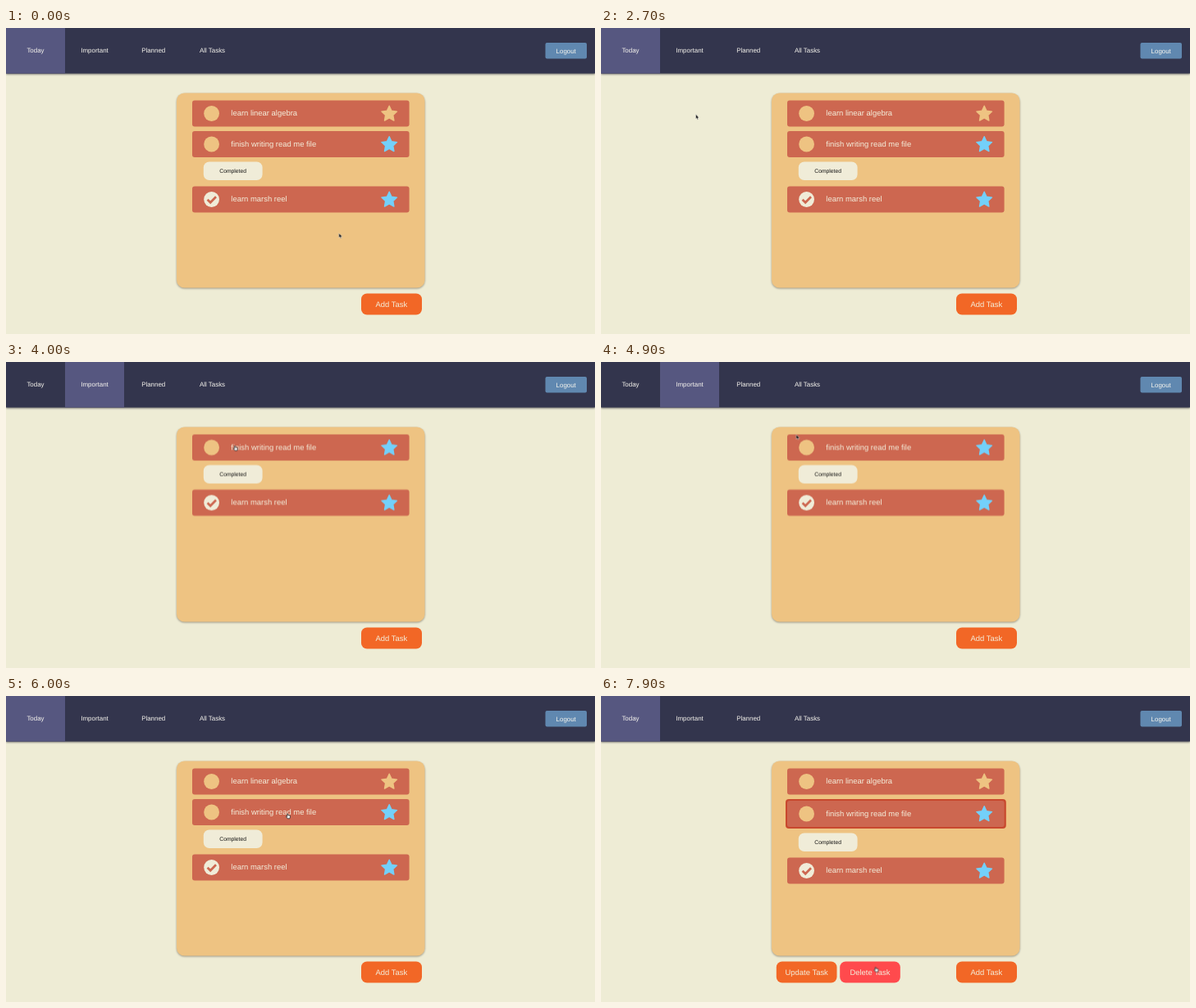
An HTML page that plays this animation: 718x374 px, repeating every 8000 ms.

```html
<!DOCTYPE html>
<html lang="en">
<head>
<meta charset="utf-8">
<title>Task list</title>
<style>
  html, body { margin: 0; height: 100%; overflow: hidden; background: #eeecd5; }
  svg { display: block; width: 100vw; height: 100vh; }
  text {
    font-family: "Liberation Sans", Arial, sans-serif;
    font-size: 9.45px; fill: #f3eedb; text-rendering: geometricPrecision;
  }
  .mid text { text-anchor: middle; }
  .tabs text { font-size: 7.95px; fill: #f7f5ee; }
  .board { filter: drop-shadow(0 1.5px 1.2px rgba(60, 50, 40, .45)); }
  .bar { filter: drop-shadow(0 1px 1.2px rgba(40, 40, 50, .7)); }
  .row { fill: #cd6750; }
  .gold { fill: #eec382; }
  .blue { fill: #73d0fa; }
  .cream { fill: #f0ecd8; }
  .orange { fill: #f26726; }
  .active { fill: #565780; }

  /* Hard state changes, all on one 8 s loop */
  .today, .important, .first, .list, .selected, .nudge, .rest, .status, .hover, .hand, .arrow {
    animation: 8s step-end infinite;
  }
  .today { animation-name: today; }
  .important { animation-name: important; }
  .first { animation-name: first; }
  .list { animation-name: list; }
  .selected { animation-name: selected; }
  .nudge { --drop: 2px; animation-name: drop; }
  .rest { --drop: 4px; animation-name: drop; }
  .status { animation-name: status; }
  .hover { animation-name: hover; }
  .hand { animation-name: hand; }
  .arrow { animation-name: arrow; }
  .cursor { animation: cursor 8s linear infinite; }

  @keyframes today {
    0%, 66.25%, 71.25%, 100% { opacity: 1; }
    47.5%, 69.4% { opacity: 0; }
  }
  @keyframes important {
    0%, 71.25%, 100% { opacity: 0; }
    36.25% { opacity: 1; }
  }
  @keyframes first {
    0%, 71.25%, 100% { opacity: 1; }
    47.5% { opacity: 0; }
  }
  @keyframes list {
    0%, 71.25%, 100% { transform: none; }
    47.5% { transform: translateY(-37.5px); }
  }
  @keyframes selected {
    0%, 23.75%, 58.75% { opacity: 0; }
    7.5%, 52.5%, 81.25%, 100% { opacity: 1; }
  }
  @keyframes drop {
    0%, 23.75%, 58.75% { transform: translateY(0); }
    7.5%, 52.5%, 81.25%, 100% { transform: translateY(var(--drop)); }
  }
  @keyframes status {
    0%, 47.5%, 71.25%, 100% { opacity: 0; }
    41.25%, 68.75% { opacity: 1; }
  }
  @keyframes hover {
    0% { fill: #fb3439; }
    92.5%, 100% { fill: #ff4a4d; }
  }
  @keyframes hand {
    0%, 28.1%, 61.25%, 87.5% { opacity: 0; }
    6.25%, 36.25%, 66.25%, 92.5%, 100% { opacity: 1; }
  }
  @keyframes arrow {
    0%, 28.1%, 61.25%, 87.5% { opacity: 1; }
    6.25%, 36.25%, 66.25%, 92.5%, 100% { opacity: 0; }
  }
  @keyframes cursor {
    0%, 1.25% { transform: translate(407.3px, 254px); }
    4% { transform: translate(392px, 205px); }
    6.25% { transform: translate(352px, 136px); }
    8.75% { transform: translate(345px, 151px); }
    11.25%, 20% { transform: translate(343px, 156px); }
    21.25%, 23.75% { transform: translate(343.5px, 157.3px); }
    25% { transform: translate(335px, 154px); }
    27.5% { transform: translate(255px, 137px); }
    31.25%, 32.5% { transform: translate(121px, 114px); }
    33.75% { transform: translate(117px, 109px); }
    36.25% { transform: translate(112px, 52px); }
    38.75%, 40% { transform: translate(110px, 38px); }
    43.75%, 45% { transform: translate(111px, 35px); }
    47.5% { transform: translate(162px, 56px); }
    50% { transform: translate(279.5px, 105.5px); }
    52.5% { transform: translate(335px, 109px); }
    55%, 58.75% { transform: translate(340px, 110px); }
    61.25% { transform: translate(240px, 92px); }
    65% { transform: translate(70px, 55px); }
    67.5%, 68.1% { transform: translate(40px, 36px); }
    70% { transform: translate(79.5px, 72px); }
    72.5% { transform: translate(230px, 122px); }
    75%, 76.25% { transform: translate(344px, 147px); }
    78.75%, 82.5% { transform: translate(347.5px, 151px); }
    83.75% { transform: translate(347.5px, 151.3px); }
    87.5% { transform: translate(340px, 225px); }
    91.25% { transform: translate(331px, 321px); }
    93.75% { transform: translate(333px, 328px); }
    98.75%, 100% { transform: translate(335.5px, 334.5px); }
  }
</style>
</head>
<body>
<svg viewBox="0 0 718 374">
  <defs>
    <rect id="row" class="row" x="227" width="264.6" height="32" rx="3"/>
    <circle id="dot" cx="250.6" cy="16" r="9.4"/>
    <path id="star" transform="translate(467.2 16.2)" stroke-width="1.4" stroke-linejoin="round"
      d="M0-9.5 2.8-3.5 9.3-2.6 4.6 1.9 5.7 8.4 0 5.3-5.7 8.4-4.6 1.9-9.3-2.6-2.8-3.5Z"/>
  </defs>

  <rect width="718" height="374" fill="#eeecd5"/>
  <rect class="bar" width="718" height="55.5" fill="#33354d"/>
  <rect class="active today" width="72" height="55.5"/>
  <rect class="active important" x="72" width="72" height="55.5"/>
  <g class="tabs mid">
    <text x="36" y="30.4">Today</text>
    <text x="108" y="30.4">Important</text>
    <text x="179.7" y="30.4">Planned</text>
    <text x="251.5" y="30.4">All Tasks</text>
    <rect x="657.5" y="18" width="50.5" height="19.5" rx="2" fill="#6088b0"/>
    <text x="682.7" y="30.6">Logout</text>
  </g>

  <rect class="gold board" x="208" y="79.5" width="302.5" height="238" rx="9.5"/>

  <g class="first"><g transform="translate(0 88.5)">
    <use href="#row"/>
    <use href="#dot" class="gold"/>
    <text x="274.3" y="18.9">learn linear algebra</text>
    <use href="#star" class="gold" stroke="#eec382"/>
  </g></g>

  <g class="list">
    <rect class="selected" x="225" y="126" width="268.8" height="36" rx="4" fill="#c8482e"/>
    <g class="nudge"><g transform="translate(0 126)">
      <use href="#row"/>
      <use href="#dot" class="gold"/>
      <text x="274.3" y="18.9">finish writing read me file</text>
      <use href="#star" class="blue" stroke="#73d0fa"/>
    </g></g>
    <g class="rest">
      <g class="mid">
        <rect class="cream" x="240.8" y="163.5" width="71.8" height="22.5" rx="7"/>
        <text x="276.7" y="177.2" style="font-size:6.76px;fill:#111">Completed</text>
      </g>
      <g transform="translate(0 193.5)">
        <use href="#row"/>
        <use href="#dot" class="cream"/>
        <path d="M245.6 16.2 249.2 19.8 256 12.8" fill="none" stroke="#cd6750" stroke-width="2.7"/>
        <text x="274.3" y="18.9">learn marsh reel</text>
        <use href="#star" class="blue" stroke="#73d0fa"/>
      </g>
    </g>
  </g>

  <g class="mid">
    <rect class="orange" x="433" y="324.5" width="74" height="26" rx="7"/>
    <text x="469.9" y="340.9">Add Task</text>
    <g class="selected">
      <rect class="orange" x="213.8" y="324.5" width="73.7" height="26" rx="7"/>
      <text x="250.7" y="340.9">Update Task</text>
      <rect class="hover" x="291.2" y="324.5" width="73.6" height="26" rx="7"/>
      <text x="328" y="340.9">Delete Task</text>
    </g>
  </g>

  <g class="status">
    <path d="M0 366H35Q36.6 366 36.6 367.6V374H0Z" fill="#89897f"/>
    <text x="1.8" y="372" style="font-size:4.9px;fill:#d8d8d0">localhost:8080</text>
  </g>

  <g class="cursor">
    <path class="arrow" d="M-1.4-3.2V2.3L-.2 1.3.7 3.2 1.6 2.8.8.9H2.4Z"
      fill="#111" stroke="#fff" stroke-width=".4"/>
    <path class="hand" d="M-1.3-2.9Q-.8-3.5-.3-2.9L-.1-1.2Q1.2-1.5 2.4-.8 2.9 1 1.9 2.8H-.8L-2.7.2Q-2.6-.7-1.2.3Z"
      fill="#eee" stroke="#222" stroke-width=".7"/>
  </g>
</svg>
</body>
</html>
```
